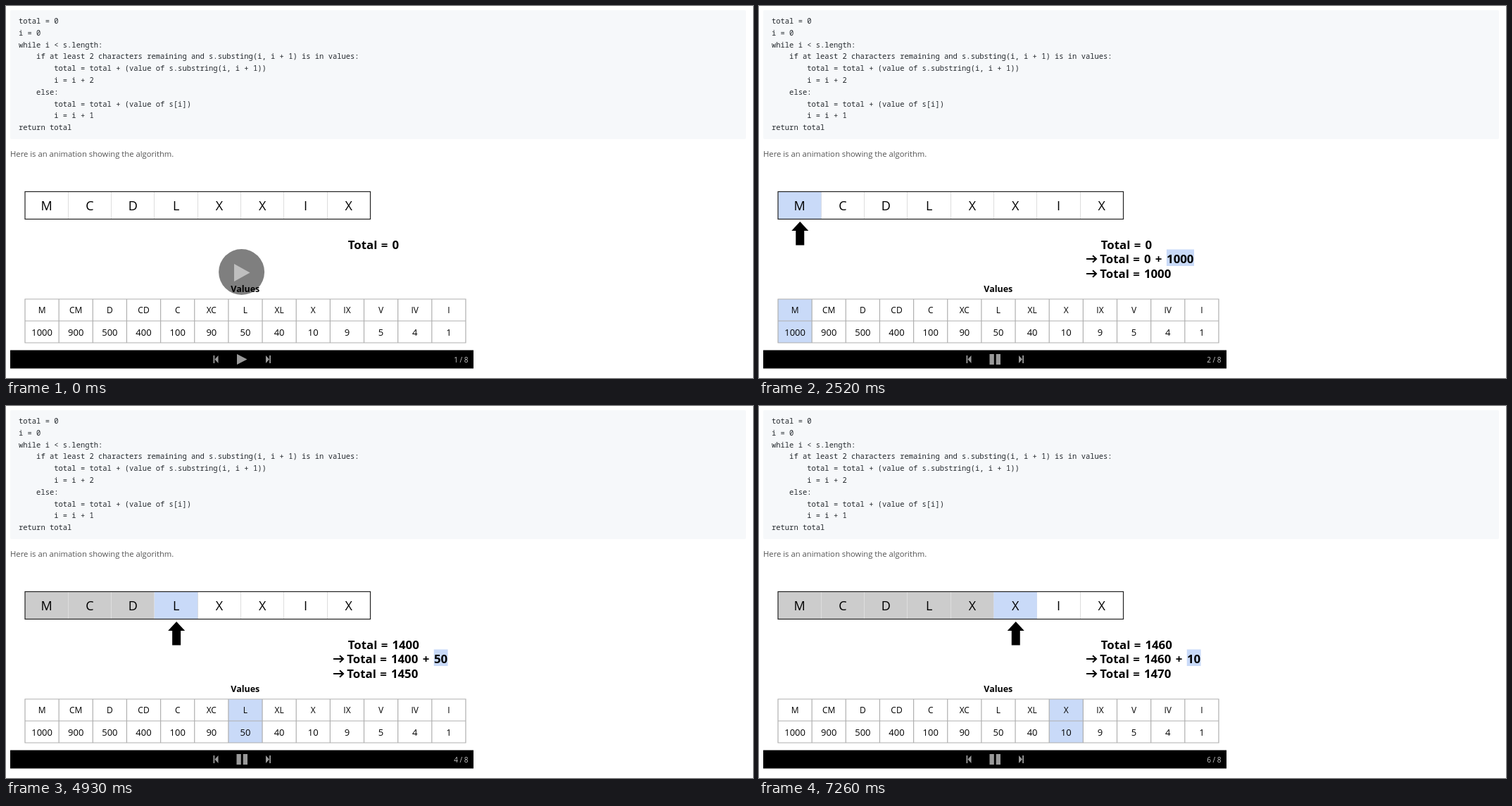
Animation, 1061 px wide and 528 px high, one loop 8000 ms. Source, as an HTML page:

```html
<!DOCTYPE html>
<html lang="en">
<head>
<meta charset="utf-8">
<title>Roman numerals algorithm</title>
<style>
  html, body { margin: 0; width: 100%; height: 100%; overflow: hidden; background: #fff; }
  svg { display: block; width: 1061px; height: 528px; font-family: "Open Sans", "Noto Sans", sans-serif; }
  .code text { font: 10.48px "Noto Sans Mono", monospace; fill: #24292e; white-space: pre; }
  .note { font-size: 11.27px; fill: #555; }
  .mid { text-anchor: middle; }
  .cell { font-size: 18px; }
  .key { font-size: 12px; }
  .num { font-size: 13px; }
  .title { font-size: 12.5px; font-weight: 700; }
  .sum { font-size: 16.8px; font-weight: 700; }
  .count { font-size: 10px; fill: #ccc; text-anchor: end; }
  .lit { fill: #c9daf8; }
  .done { fill: #ccc; }
</style>
</head>
<body>
<svg id="stage" viewBox="0 0 1061 528">
  <rect x="6" y="6" width="1045" height="183" rx="2" fill="#f6f8fa"/>
  <g id="code" class="code"></g>
  <text class="note" x="6" y="213.5">Here is an animation showing the algorithm.</text>

  <rect id="done" class="done" x="27" y="264" height="38"/>
  <g id="dividers" stroke="#ddd"></g>
  <rect id="litCells" class="lit" y="264" height="38"/>
  <rect x="27" y="263.5" width="490.5" height="39" fill="none" stroke="#222" stroke-width="1.2"/>
  <g id="letters" class="cell mid"></g>
  <path id="pointer" d="M0 306L12 319H6V339.5H-6V319H-12Z"/>

  <g id="sums" class="sum"></g>

  <text class="title mid" x="339.8" y="406">Values</text>
  <rect id="litValue" class="lit" y="416" width="48.15" height="62"/>
  <path id="grid" fill="none" stroke="#b0b0b0" stroke-width="1.2"/>
  <g id="table" class="mid"></g>

  <rect x="6" y="488.5" width="658" height="26"/>
  <path fill="#999" d="M294.5 496h1.8v11h-1.8zM301.5 496v11l-5-5.5zM369 496v11l5-5.5zM374.2 496h1.8v11h-1.8z"/>
  <path id="play" d="M328 494L342.5 501.5L328 509Z"/>
  <path id="pause" d="M327.5 494h6.3v15h-6.3zM336.7 494h6.3v15h-6.3z"/>
  <text id="count" class="count" x="656.5" y="505.5"></text>

  <g id="overlay">
    <circle cx="334.6" cy="377.5" r="32.5" opacity=".5"/>
    <path d="M324 366L346.5 378.5L324 391Z" fill="#bfbfbf"/>
  </g>
  <circle id="click" cx="331" cy="502" r="11" fill="#ff0" opacity=".47"/>
  <g id="cursor" fill="#fff" stroke="#000" stroke-linejoin="round">
    <path id="arrow" d="M.5 .5V16L4 12.7L6.5 18.3L9 17.2L6.5 11.7H11.5Z"/>
    <path id="hand" d="M-1.5 13V1.5Q0 -.5 1.5 1.5V7Q3.5 5.5 5 7.5Q7 6.5 8.2 8.5Q11 8 11 10.5V15L9 19V21.5H-1V19L-4.5 13Q-4.5 10.5 -1.5 13Z"/>
  </g>
</svg>
<script>
const $ = id => document.getElementById(id);
const LOOP = 8000, CELL = 61.3, COL = 48.15, DIGIT = 9.61;

const code = `total = 0
i = 0
while i < s.length:
    if at least 2 characters remaining and s.substing(i, i + 1) is in values:
        total = total + (value of s.substring(i, i + 1))
        i = i + 2
    else:
        total = total + (value of s[i])
        i = i + 1
return total`;
const numeral = "MCDLXXIX";
const values = { M: 1000, CM: 900, D: 500, CD: 400, C: 100, XC: 90, L: 50, XL: 40, X: 10, IX: 9, V: 5, IV: 4, I: 1 };
const keys = Object.keys(values);

function add(parent, tag, attrs, text = "") {
  const node = document.createElementNS("http://www.w3.org/2000/svg", tag);
  for (const name in attrs) node.setAttribute(name, attrs[name]);
  node.textContent = text;
  parent.append(node);
}
const set = (id, attrs) => { for (const name in attrs) $(id).setAttribute(name, attrs[name]); };
const show = (id, on) => set(id, { visibility: on ? "visible" : "hidden" });

code.split("\n").forEach((line, i) => add($("code"), "text", { x: 18, y: 25 + i * 16.8 }, line));
[...numeral].forEach((letter, i) => {
  const x = 27 + i * CELL;
  add($("letters"), "text", { x: x + CELL / 2, y: 289.5 }, letter);
  if (i) add($("dividers"), "path", { d: `M${Math.floor(x) + .5} 264V302` });
});
let gridPath = "M26.5 416H653.5M26.5 447H653.5M26.5 478H653.5";
for (let i = 0; i <= keys.length; i++) gridPath += `M${27 + i * COL} 416V478`;
set("grid", { d: gridPath });
keys.forEach((key, i) => {
  const x = 27 + (i + .5) * COL;
  add($("table"), "text", { x, y: 436.4, class: "key" }, key);
  add($("table"), "text", { x, y: 467.6, class: "num" }, values[key]);
});

// Each slide consumes one symbol of the numeral.
const slides = [{ start: 0, total: 0 }];
const symbols = ["M", "CD", "L", "X", "X"], starts = [2450, 3680, 4860, 6020, 7260];
let total = 0, from = 0;
symbols.forEach((key, i) => {
  slides.push({ start: starts[i], key, total, from });
  total += values[key];
  from += key.length;
});

function sumLine(x, y, number) {
  const put = (dx, text) => add($("sums"), "text", { x: x + dx, y }, text);
  put(0, "Total");
  put(47, "=");
  put(62.6, number);
  return x + 62.6 + String(number).length * DIGIT;
}

function drawSlide(index) {
  const { key, total, from } = slides[index];
  $("sums").replaceChildren();
  $("count").textContent = `${index + 1} / 8`;
  sumLine(485.8, 345, total);
  for (const id of ["done", "litCells", "litValue", "pointer"]) show(id, key);
  if (!key) return;

  const x = 27 + from * CELL, width = key.length * CELL, value = values[key];
  set("done", { width: from * CELL });
  set("litCells", { x, width });
  set("litValue", { x: 27 + keys.indexOf(key) * COL });
  set("pointer", { transform: `translate(${x + width / 2 + .6})` });

  const end = sumLine(484.3, 365, total);
  add($("sums"), "rect", { x: end + 22.4, y: 345.5, width: String(value).length * DIGIT + .6, height: 23.5, class: "lit" });
  add($("sums"), "text", { x: end + 6.3, y: 365 }, "+");
  add($("sums"), "text", { x: end + 22.6, y: 365 }, value);
  sumLine(484.3, 386, total + value);
  for (const y of [359, 380])
    add($("sums"), "path", { d: `M465 ${y}H478.5M474 ${y - 4.7}L479 ${y}L474 ${y + 4.7}`, fill: "none", stroke: "#000", "stroke-width": 2 });
}

function drawMouse(t) {
  const step = Math.max(0, Math.min(8, Math.floor((t - 280) / 77.5 + 1e-6))) / 8;
  const rest = 1 - step * step * (3 - 2 * step);
  const left = t >= 1590, seen = t >= 280 && t < 1670;
  const x = 331 + 225 * rest + (left ? 9 : 0), y = 502 - 31 * rest - (left ? 1 : 0);
  const onButton = seen && x < 345;
  set("cursor", { transform: `translate(${x} ${y})` });
  show("arrow", seen && !onButton);
  show("hand", onButton);
  show("click", t >= 1130 && t < 1280);
  const playing = t >= 1280;
  show("overlay", !playing);
  show("play", !playing);
  show("pause", playing);
  const fill = onButton && !left ? "#ccc" : "#999";
  set("play", { fill });
  set("pause", { fill });
}

let shown = -1;
const origin = performance.now();
function frame() {
  const t = (performance.now() - origin) % LOOP;
  const index = slides.findLastIndex(slide => t >= slide.start);
  if (index !== shown) drawSlide(shown = index);
  drawMouse(t);
  requestAnimationFrame(frame);
}
frame();
</script>
</body>
</html>
```
